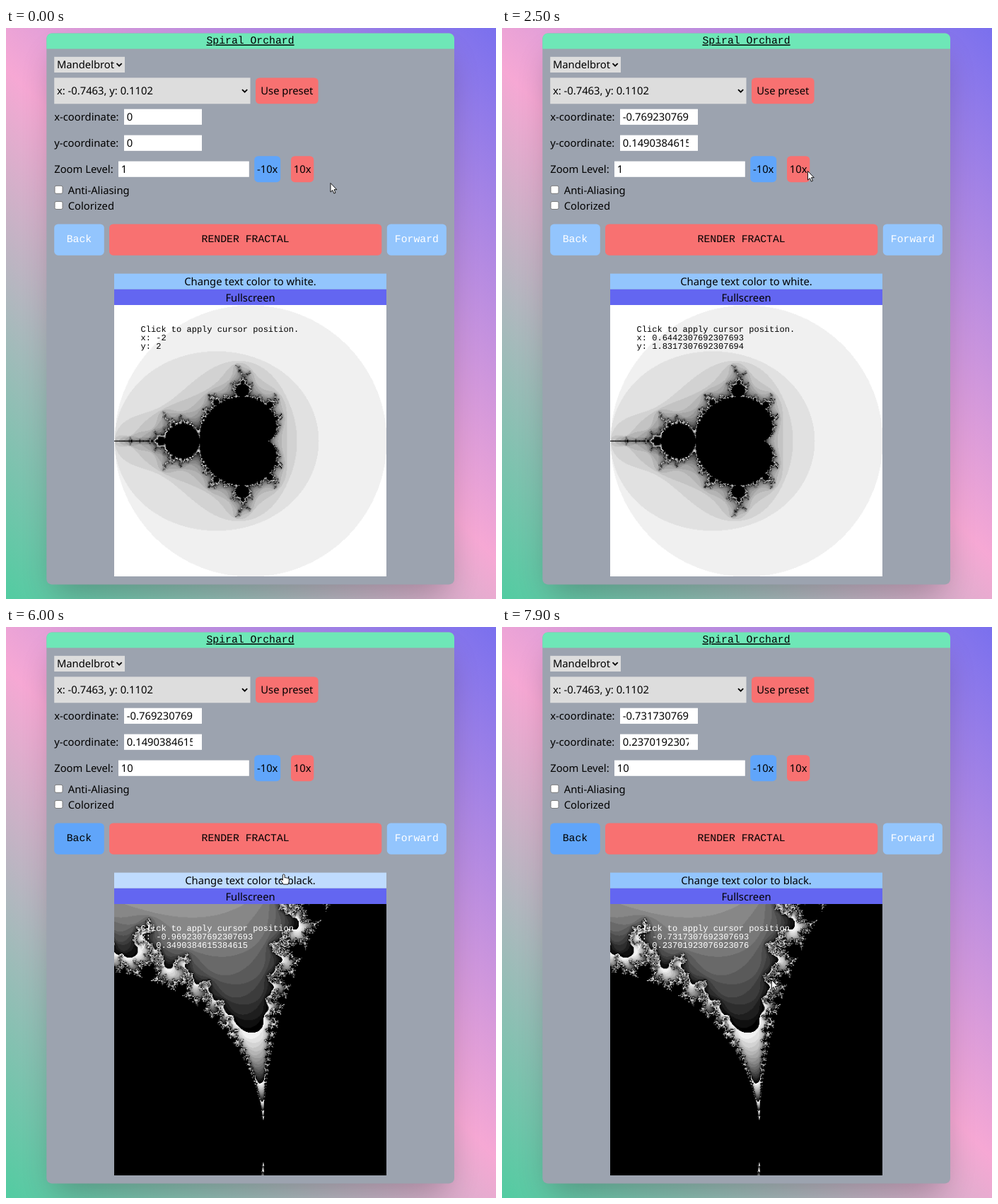
Animation, 693 px wide and 808 px high, one loop 8000 ms. Source, as an HTML page with a canvas:

```html
<!DOCTYPE html>
<html lang="en">
<head>
<meta charset="utf-8">
<title>Fractal viewer</title>
<style>
html, body { margin: 0; width: 100%; height: 100%; overflow: hidden; }
body { background: linear-gradient(45deg, #52cca1, #f6a8d4, #7a70ee); }
svg { display: block; position: absolute; left: 0; top: 0; }
text { font: 14.79px "Noto Sans", sans-serif; text-rendering: geometricPrecision; }
.mono { font-family: "Liberation Mono", monospace; }
.readout text { font: 12.02px "Liberation Mono", monospace; }
.mid { text-anchor: middle; }
.title { text-decoration: underline; }
canvas { display: block; width: 100%; height: 100%; }
</style>
</head>
<body>
<svg id="stage" width="693" height="808" viewBox="0 0 693 808"></svg>
<script>
const LOOP = 8000, STEP = 100, LAG = 66, GRID = 416;
const APPLY = 2100, RENDER = 3900, DONE = 5100, RECOLOR = 5900, APPLY_AGAIN = 7900;
const RED = '#f87171', RED_HOVER = '#fca5a5', BLUE = '#60a5fa', BLUE_PALE = '#93c5fd',
  BLUE_HOVER = '#bfdbfe', INDIGO = '#6366f1', INDIGO_HOVER = '#818cf8';
const LEFT = 68.2, MIDDLE = 345.5, LINE = 22.2, BUTTON = 36.9;
const VIEW = { x: 153, y: 392, w: 385, h: 384 };

const row = i => 51.9 + 36.95 * i;
const rect = (x, y, w, h, fill, more = '') =>
  `<rect x="${x}" y="${y}" width="${w}" height="${h}" fill="${fill}" ${more}/>`;
const label = (x, y, str, cls = '', id = '') =>
  `<text x="${x}" y="${y}" class="${cls}" id="${id}">${str}</text>`;
const button = (id, x, cy, w, h, fill, str, cls = '') =>
  rect(x, cy - h / 2, w, h, fill, `rx="5.5" id="${id}"`) +
  label(x + w / 2, cy + (cls ? 3.7 : 5.5), str, 'mid ' + cls, id + 'Text');
const mainButton = (id, x, w, fill, str) => button(id, x, 299.6, w, 44.2, fill, str, 'mono');
const dropdown = (cy, w, h, str) =>
  rect(LEFT, cy - h / 2, w, h, '#ddd') + label(LEFT + 3.7, cy + 5.5, str) +
  `<path d="M${LEFT + w - 11.5} ${cy - 1.8}l3.6 3.6l3.6 -3.6" fill="none" stroke="#000" stroke-width="1.8"/>`;
const field = (id, cy, str, x, w) =>
  label(LEFT, cy + 5.5, str) + rect(x, cy - LINE / 2, w, LINE, '#fff') +
  `<g clip-path="url(#inside)">${label(x + 3.8, cy + 5.5, '', '', id)}</g>`;
const checkbox = (cy, str) =>
  rect(69, cy - 6, 11, 11, '#fff', 'rx="2" stroke="#767676" stroke-width=".95"') + label(87.7, cy + 5.6, str);
const bar = (id, y, str) =>
  rect(VIEW.x, y, VIEW.w, LINE, BLUE_PALE, `id="${id}"`) + label(MIDDLE, y + 16.7, str, 'mid', id + 'Text');

document.getElementById('stage').innerHTML = `
  <defs>
    <filter id="blur" x="-30%" y="-30%" width="160%" height="160%"><feGaussianBlur stdDeviation="23"/></filter>
    <clipPath id="inside"><rect x="160" y="110" width="104" height="110"/></clipPath>
  </defs>
  <g id="panel">
    ${rect(68.4, 41.6, 554.6, 758, '#000', 'id="shadow" rx="7" opacity=".25" filter="url(#blur)"')}
    ${rect(57.3, 7.5, 576.7, 780, '#9ca3af', 'id="body" rx="7.4"')}
    <path d="M57.3 29.6V14.9a7.4 7.4 0 0 1 7.4 -7.4H626.6a7.4 7.4 0 0 1 7.4 7.4V29.6z" fill="#6ee7b7"/>
    ${label(MIDDLE, 22.4, 'Spiral Orchard', 'mid mono title')}
    ${dropdown(row(0), 99.8, LINE, 'Mandelbrot')}
    ${dropdown(row(1), 277.3, BUTTON, 'x: -0.7463, y: 0.1102')}
    ${button('preset', 353, row(1), 88.6, BUTTON, RED, 'Use preset')}
    ${field('fieldX', row(2), 'x-coordinate:', 167, 110)}
    ${field('fieldY', row(3), 'y-coordinate:', 167, 110)}
    ${field('zoom', row(4), 'Zoom Level:', 159, 184.8)}
    ${button('less', 351.2, row(4), 37, BUTTON, BLUE, '-10x')}
    ${button('more', 403, row(4), 32.3, BUTTON, RED, '10x')}
    ${checkbox(229.3, 'Anti-Aliasing')}${checkbox(229.3 + LINE, 'Colorized')}
    ${mainButton('back', LEFT, 70.6, BLUE_PALE, 'Back')}
    ${mainButton('render', 146, 385.3, RED, 'RENDER FRACTAL')}
    ${mainButton('forward', 538.8, 84.1, BLUE_PALE, 'Forward')}
    ${label(MIDDLE, 364.4, 'Rendering fractal...', 'mid', 'busy')}
  </g>
  <g id="view">
    ${bar('tint', VIEW.y - 2 * LINE, '')}${bar('full', VIEW.y - LINE, 'Fullscreen')}
    <foreignObject x="${VIEW.x}" y="${VIEW.y}" width="${VIEW.w}" height="${VIEW.h}">
      <canvas id="whole" width="${GRID}" height="${GRID}"></canvas>
      <canvas id="closeup" width="${GRID}" height="${GRID}"></canvas>
    </foreignObject>
    <g class="readout" id="readout">
      ${label(190.6, 430, 'Click to apply cursor position.')}
      ${label(190.6, 442, '', '', 'readX')}${label(190.6, 454, '', '', 'readY')}
    </g>
  </g>
  <g id="cursor" fill="#fff" stroke="#000" stroke-width=".9" stroke-linejoin="round">
    <path id="arrow" d="M0 0V12.6L2.9 10L4.9 14.6L7 13.7L5 9.2H8.8Z"/>
    <path id="hand" d="M-1.4 1Q0 -.9 1.4 1V5.2Q2.7 4.2 3.8 5.4Q5 4.6 6 5.9Q7.6 5.6 7.6 7.2V10Q7.4 12.5 6.3 14.4H-.6Q-2 11.5 -4.6 8.6Q-4.8 6.6 -3 7.2L-1.4 8.6Z"/>
  </g>`;

const el = {};
document.querySelectorAll('[id]').forEach(node => { el[node.id] = node; });
const set = (node, attrs) => { for (const k in attrs) node.setAttribute(k, attrs[k]); };
const show = (node, on) => { node.style.display = on ? '' : 'none'; };

function drawFractal(canvas, [cx, cy], zoom) {
  const ctx = canvas.getContext('2d'), image = ctx.createImageData(GRID, GRID);
  const size = 4 / GRID / zoom, limit = 100;
  for (let p = 0; p < GRID * GRID; p++) {
    const a = cx + (p % GRID - GRID / 2) * size;
    const b = cy - (Math.floor(p / GRID) - GRID / 2) * size;
    let x = a, y = b, n = 0;
    while (n < limit && x * x + y * y <= 4) {
      const next = x * x - y * y + a;
      y = 2 * x * y + b;
      x = next;
      n++;
    }
    const shade = n < limit ? (255 - 15 * n) & 255 : 0;
    image.data.set([shade, shade, shade, 255], p * 4);
  }
  ctx.putImageData(image, 0, 0);
}

// Each stop: where the pointer rests, when it arrives, how long it travels, sideways bow.
const stops = [
  { x: 459, y: 219.5, at: 0 },
  { x: 239, y: 600, at: 1100, travel: 600 },
  { x: 271.5, y: 569.5, at: 1600, travel: 500 },
  { x: 432.5, y: 202.5, at: 2500, travel: 500, bow: 66 },
  { x: 426.3, y: 303.5, at: RENDER, travel: STEP },
  { x: 395, y: 357, at: RECOLOR, travel: 300 },
  { x: 373.2, y: 287, at: 6300, travel: 400 },
  { x: 381.3, y: 499.3, at: 7500, travel: 900 }
];
const ease = u => u * u * u * (u * (6 * u - 15) + 10);

function pointer(t) {
  let [x, y] = [stops[0].x, stops[0].y];
  for (const { x: toX, y: toY, at, travel, bow = 0 } of stops.slice(1)) {
    const u = ease(Math.min(1, Math.max(0, (t - at + travel) / travel)));
    x += (toX - x) * u + bow * Math.sin(Math.PI * u);
    y += (toY - y) * u;
  }
  return [x, y];
}

// Complex coordinates of the last grid point touched since the picture appeared.
function probe(t, since, [cx, cy], zoom) {
  let col = 0, line = 0;
  for (let s = t; s >= since; s -= STEP) {
    const [x, y] = pointer(s - LAG);
    if (x >= VIEW.x && x < VIEW.x + VIEW.w && y >= VIEW.y) {
      col = Math.round((x - VIEW.x) / VIEW.w * GRID);
      line = Math.floor((y - VIEW.y) / VIEW.h * GRID) + 0.5;
      break;
    }
  }
  const size = 4 / GRID;
  return [cx + (col - GRID / 2) * size / zoom, cy + (GRID / 2 - line) * size / zoom];
}

const ORIGIN = [0, 0];
const pick = probe(APPLY - STEP, 0, ORIGIN, 1);
const secondPick = probe(APPLY_AGAIN - STEP, DONE, pick, 10);

function update(now) {
  const t = Math.floor(now % LOOP / STEP) * STEP;
  const busy = t >= RENDER && t < DONE, zoomed = t >= DONE, white = t >= RECOLOR;
  const [x, y] = pointer(t);
  const [readX, readY] = zoomed ? probe(t, DONE, pick, 10) : probe(t, 0, ORIGIN, 1);
  const over = (top, bottom) => zoomed && y >= top && y < bottom;
  const onRender = over(277.5, 321.7);
  const onTint = over(VIEW.y - 2 * LINE, VIEW.y - LINE), onFull = over(VIEW.y - LINE, VIEW.y);

  set(el.panel, { transform: `translate(0 ${busy ? 203.3 : 0})` });
  set(el.body, { height: busy ? 373.3 : 780 });
  set(el.shadow, { height: busy ? 351.1 : 757.8 });
  show(el.busy, busy);
  show(el.view, !busy);
  show(el.whole, !zoomed);
  show(el.closeup, zoomed);

  const [fieldX, fieldY] = t < APPLY ? ORIGIN : t < APPLY_AGAIN ? pick : secondPick;
  el.fieldX.textContent = fieldX;
  el.fieldY.textContent = fieldY;
  el.zoom.textContent = t < RENDER ? 1 : 10;
  el.readX.textContent = 'x: ' + readX;
  el.readY.textContent = 'y: ' + readY;
  el.tintText.textContent = `Change text color to ${white ? 'black' : 'white'}.`;

  set(el.readout, { fill: white ? '#fff' : '#000' });
  set(el.preset, { fill: busy ? RED_HOVER : RED });
  set(el.render, { fill: onRender ? RED_HOVER : RED });
  set(el.tint, { fill: onTint ? BLUE_HOVER : BLUE_PALE });
  set(el.full, { fill: onFull ? INDIGO_HOVER : INDIGO });
  set(el.back, { fill: zoomed ? BLUE : BLUE_PALE });
  set(el.backText, { fill: zoomed ? '#000' : '#fff' });

  const hand = busy || onRender || onTint || onFull;
  set(el.cursor, { transform: `translate(${x} ${y})` });
  show(el.hand, hand);
  show(el.arrow, !hand);
}

drawFractal(el.whole, ORIGIN, 1);
drawFractal(el.closeup, pick, 10);
set(el.forwardText, { fill: '#fff' });

let start;
function frame(now) {
  start ??= now;
  update(now - start);
  requestAnimationFrame(frame);
}
update(0);
requestAnimationFrame(frame);
</script>
</body>
</html>
```
